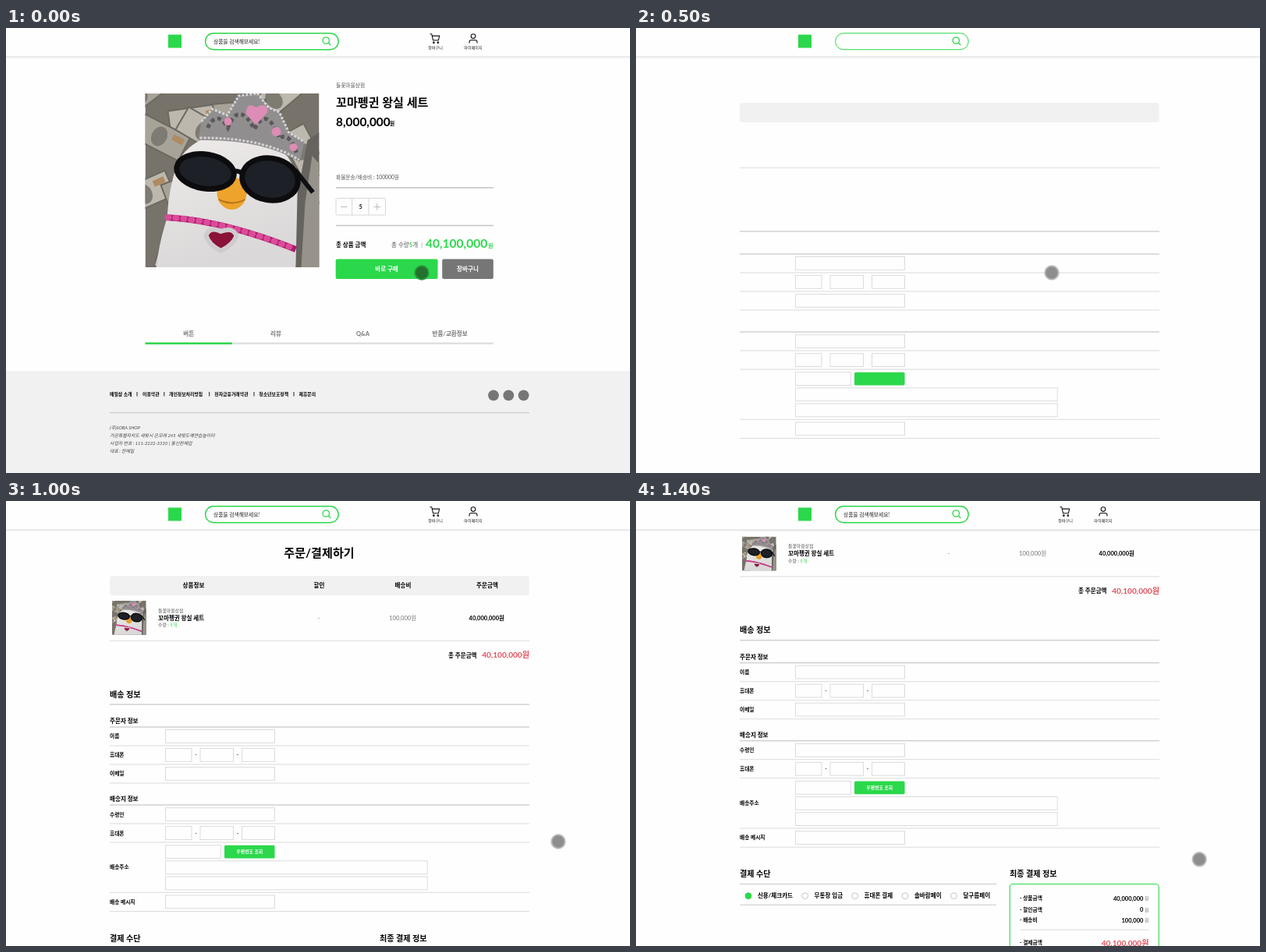
Write an HTML page that moves like this. It is 800 by 571 pixels and loops after 1500 ms.

```html
<!DOCTYPE html>
<html lang="ko">
<head>
<meta charset="utf-8">
<style>
html, body { margin: 0; width: 100%; height: 100%; overflow: hidden; background: #fffefe; }
svg { display: block; }
#stage { width: 100vw; height: 100vh; }
text { font-family: Lato, "Noto Sans CJK KR", "Noto Sans CJK", sans-serif; white-space: pre; }
.bare text, .bare .late { visibility: hidden; }
.bare #search { stroke-width: 1; }
</style>
</head>
<body>
<svg id="stage" viewBox="0 0 800 571">
  <defs>
    <linearGradient id="shade" x2="0" y2="1">
      <stop stop-color="#d8d8da"/><stop offset="1" stop-color="#fffefe" stop-opacity="0"/>
    </linearGradient>
    <linearGradient id="plush" x2=".3" y2="1">
      <stop stop-color="#efecea"/><stop offset="1" stop-color="#dad8d8"/>
    </linearGradient>
    <symbol id="photo" viewBox="0 0 223 223">
      <path fill="#77736b" d="M0 0h223v223H0z"/>
      <g id="notes"></g>
      <path fill="url(#plush)" d="M14 223Q18 190 28 160Q30 120 42 88Q60 54 110 50Q170 54 188 90Q202 130 193 223z"/>
      <path fill="#66635e" d="M193 223L195 130L208 60L223 50V223z"/>
      <path fill="#97938a" d="M200 223L205 140L214 80L223 90V223z"/>
      <path fill="#918e90" d="M68 60L72 36L86 20L105 28L120 3L144 0L158 18L172 24L184 50L204 62L198 88Q150 58 68 60z"/>
      <path fill="none" stroke="#5b5859" stroke-width="5" stroke-dasharray="5 4" d="M80 44Q92 20 106 44Q120 8 140 46Q156 14 172 58Q184 48 194 76"/>
      <path fill="none" stroke="#d5d3d4" stroke-width="3" stroke-dasharray="3 2" d="M70 57Q150 56 197 85M72 36L86 20L105 28L120 3L144 0L158 18L172 24L184 50L204 62"/>
      <g fill="#dd8db6">
        <path d="M142 40L129 26Q130 9 142 18Q156 10 157 24z"/>
        <circle cx="168" cy="49" r="6"/><circle cx="190" cy="69" r="5"/><circle cx="106" cy="36" r="5"/>
      </g>
      <ellipse cx="111" cy="128" rx="19" ry="21" fill="#eea32c"/>
      <path fill="none" stroke="#b87418" stroke-width="2" d="M94 136Q112 145 128 136"/>
      <path fill="none" stroke="#101012" stroke-width="6" d="M106 102Q116 96 128 104M192 98L215 127"/>
      <g fill="#1d2026" stroke="#0c0c0e" stroke-width="7">
        <ellipse cx="77" cy="100" rx="37" ry="22" transform="rotate(9 77 100)"/>
        <ellipse cx="160" cy="110" rx="36" ry="27" transform="rotate(9 160 110)"/>
      </g>
      <path fill="none" stroke="#a91d69" stroke-width="8" d="M27 159Q100 163 193 200"/>
      <path fill="none" stroke="#dc4b9b" stroke-width="8" stroke-linecap="round" stroke-dasharray="1 9" d="M29 159Q100 163 193 200"/>
      <path fill="#8b1238" stroke="#cfccd0" stroke-width="6" stroke-linejoin="round" d="M97 202Q81 194 78 182Q83 170 97 177Q113 171 117 183Q113 194 97 202z"/>
    </symbol>
  </defs>
  <g id="product"></g>
  <g id="order"></g>
  <g id="header"></g>
  <circle id="dot" r="8.7" stroke-width="2"/>
</svg>
<script>
const $ = id => document.getElementById(id);
const GREEN = '#2bd84b', GRAY = '#767676', RED = '#e0505c', BLACK = '#000';

const text = (x, y, s, size = 7.56, weight = 700, fill = BLACK, anchor = 'start', extra = '') =>
  `<text x="${x}" y="${y}" font-size="${size}" font-weight="${weight}" fill="${fill}" text-anchor="${anchor}" ${extra}>${s}</text>`;
const mid = (x, y, s, size, weight, fill) => text(x, y, s, size, weight, fill, 'middle');
const end = (x, y, s, size, weight, fill) => text(x, y, s, size, weight, fill, 'end');
const rect = (x, y, w, h, fill, r = 0, extra = '') =>
  `<rect x="${x}" y="${y}" width="${w}" height="${h}" rx="${r}" fill="${fill}" ${extra}/>`;
const line = (x, y, x2, color = '#dcdade', w = 1) => rect(x, y - w / 2, x2 - x, w, color);
const field = (x, y, w) => rect(x, y, w, 16.8, '#fffefe', 0, 'stroke="#dcdade"');
const photo = (x, y, size) =>
  `<use href="#photo" x="${x}" y="${y}" width="${size}" height="${size}"/>`;

function notes() {
  let s = '';
  for (let i = 0; i < 16; i++) {
    const x = (i * 83) % 230 - 20, y = (i * 47) % 215 - 12, a = (i * 67) % 150 - 75;
    s += `<g transform="translate(${x} ${y}) rotate(${a})">` +
      rect(-32, -17, 68, 34, i % 2 ? '#bcb8ae' : '#a7a399', 0, 'stroke="#6d695f" stroke-width="2"') +
      `<ellipse rx="10" ry="13" fill="#7e7b72"/>` + rect(16, -11, 15, 8, '#b08a62') + '</g>';
  }
  return s;
}

function header() {
  return rect(0, 0, 800, 37, '#fffefe') + rect(0, 36.5, 800, 3.5, 'url(#shade)') +
    rect(208, 8.5, 17, 17, GREEN) +
    rect(255.6, 6.7, 170.6, 21, '#fffefe', 10.5, `id="search" stroke="${GREEN}" stroke-width="1.4"`) +
    text(266, 19.7, '상품을 검색해보세요!', 6.72, 400, '#222') +
    `<g fill="none" stroke="${GREEN}" stroke-width="1.3"><circle cx="410.3" cy="16" r="4.2"/><path d="M413.3 19l3 3"/></g>
     <g class="late" fill="none" stroke="#111" stroke-width="1.1" stroke-linejoin="round">
       <path d="M543.5 7.8h2.3l1.8 8h6.7l1.4-5.7h-9.4"/>
       <circle cx="548.4" cy="18.7" r=".8"/><circle cx="553.8" cy="18.7" r=".8"/>
       <circle cx="599" cy="10.6" r="2.8"/><path d="M594 19.5v-1.4q0-2.6 2.6-2.6h4.8q2.6 0 2.6 2.6v1.4"/>
     </g>` +
    mid(550.5, 26.5, '장바구니', 5.1, 400, '#222') + mid(599, 26.5, '마이페이지', 5.1, 400, '#222');
}

function product() {
  const tabs = ['버튼', '리뷰', 'Q&amp;A', '반품/교환정보'];
  const links = [[133, '메밀샵 소개'], [175, '이용약관'], [209, '개인정보처리방침'],
    [267.3, '전자금융거래약관'], [324.3, '청소년보호정책'], [375.5, '제휴문의']];
  const about = ['(주)SOBA SHOP', '가온특별자치도 새빛시 은모래 245 새빛도예연습놀이터',
    '사업자 번호 : 111-2222-3333 | 통신판매업', '대표 : 한메밀'];
  return photo(178.5, 84, 223) +
    text(423, 76, '들꽃마을상점', 6.72, 400, '#555') +
    text(423, 100.5, '꼬마펭귄 왕실 세트', 15.1) +
    text(423, 126, '8,000,000', 15.4) + text(492, 125, '원', 6.72) +
    text(423, 193.5, '화물운송/배송비 : 100000원', 6.72, 400, '#555') +
    line(423, 205, 625, '#c4c2c4', 1.5) + line(423, 253.5, 625, '#c4c2c4', 1.5) +
    rect(423, 218.5, 63.5, 21.5, '#fffefe', 1.5, 'stroke="#d4d2d4" stroke-width=".9"') +
    '<path fill="none" stroke="#d4d2d4" stroke-width=".9" d="M443.7 218.5v21.5M465 218.5v21.5"/>' +
    '<path fill="none" stroke="#bbb" d="M429 229.5h8.5M471.5 229.5h8.5M475.7 225.2v8.6"/>' +
    mid(454.6, 231.8, '5', 6.72) +
    text(423, 281.3, '총 상품 금액') +
    text(494, 281.3, `총 수량<tspan fill="${GREEN}" font-weight="700">5</tspan>개`, 7.56, 400, '#555') +
    rect(532.7, 275, .8, 7.5, '#bbb') +
    text(538, 282.1, '40,100,000', 15.5, 700, GREEN) + text(618, 281.5, '원', 7, 700, GREEN) +
    rect(422.7, 296.5, 130.8, 25.5, GREEN, 2, 'id="buy"') +
    text(488, 312.2, '바로 구매', 7.56, 700, '#fff', 'middle', 'id="buyText"') +
    rect(559.2, 296.5, 65.6, 25.5, GRAY, 2) + mid(592, 312.2, '장바구니', 7.56, 700, '#fff') +
    tabs.map((s, i) => mid(234.3 + i * 111.6, 395.3, s, 7.56, 700, GRAY)).join('') +
    line(178.5, 404.7, 625, '#e0dfe0', 2.4) + line(178.5, 404.7, 290, GREEN, 2.4) +
    rect(0, 440, 800, 131, '#f2f1f2') +
    links.map(([x, s]) => text(x, 472, s, 5.88)).join('') +
    [168, 202.8, 260.7, 318, 369].map(x => rect(x - .5, 467, 1, 5.5, '#222')).join('') +
    [625, 644.3, 663.6].map(x => `<circle cx="${x}" cy="471.3" r="6.9" fill="${GRAY}"/>`).join('') +
    line(133, 493.7, 671, '#c4c3c4') +
    about.map((s, i) => text(133, 514.6 + i * 10.1, s, 5.88, 400, '#444', 'start', 'font-style="italic"')).join('');
}

function order() {
  const label = (y, s) => text(133, y, s, 6.72);
  const phone = y => label(y + 10.8, '휴대폰') + field(204.5, y, 33.5) + field(249, y, 42.5) +
    field(302.5, y, 42) + mid(243.6, y + 10.8, '-', 7, 400) + mid(297, y + 10.8, '-', 7, 400);
  const row = (y, s) => label(y + 10.8, s) + field(204.5, y, 140);
  const heads = [[240.5, '상품정보'], [401.5, '할인'], [509, '배송비'], [617, '주문금액']];
  const pays = [[144, '신용/체크카드'], [216.7, '무통장 입금'], [280.7, '휴대폰 결제'],
    [345, '솔바람페이'], [407.5, '달구름페이']];
  const sums = [[594.5, '상품금액', '40,000,000'], [609, '할인금액', '0'], [622.8, '배송비', '100,000']];
  const thin = [179.3, 314, 338, 362, 414, 438, 502.3, 526.5];
  return mid(401.5, 72, '주문/결제하기', 15.1) +
    rect(133, 96, 537.7, 25.2, '#f2f1f2', 4) +
    heads.map(([x, s]) => mid(x, 111.4, s)).join('') +
    `<g class="late" style="clip-path:inset(0 round 4px)">${photo(136, 128, 43.7)}</g>` +
    text(195, 142.7, '들꽃마을상점', 5.88, 400, '#555') +
    text(195, 152.6, '꼬마펭귄 왕실 세트') +
    text(195, 161, `수량 : <tspan fill="${GREEN}">5개</tspan>`, 5.88, 400, '#555') +
    mid(401, 152.5, '-', 7.56, 400, GRAY) + mid(508.7, 152.8, '100,000원', 7.56, 400, GRAY) +
    mid(616.3, 152.8, '40,000,000원') +
    thin.map(y => line(133, y, 671)).join('') +
    text(567, 200.7, '총 주문금액') + end(671, 201, '40,100,000원', 10.1, 700, RED) +
    text(133, 251.8, '배송 정보', 10.1) +
    [261, 290, 390].map(y => line(133, y, 671, '#c8c6ca', 1.2)).join('') +
    text(133, 285.2, '주문자 정보') +
    row(293.5, '이름') + phone(317.5) + row(341.5, '이메일') +
    text(133, 385.3, '배송지 정보') +
    row(393.7, '수령인') + phone(417.7) +
    field(204.5, 441.7, 71) + rect(280, 441.7, 64.5, 16.8, GREEN, 1.5) +
    mid(312.3, 452.4, '우편번호 조회', 5.88, 700, '#fff') +
    label(472.4, '배송주소') + field(204.5, 461.8, 335.7) + field(204.5, 482, 335.7) +
    row(505.9, '배송 메시지') +
    text(133, 564.8, '결제 수단', 10.1) + text(479, 564.8, '최종 결제 정보', 10.1) +
    '<g class="late">' + line(133, 573.8, 462, '#c8c6ca') + line(133, 600.5, 462, '#c8c6ca') +
    pays.map(([x, s], i) => `<circle cx="${x}" cy="589" r="3.9" fill="${i ? '#fff' : GREEN}" stroke="${i ? '#c4c4c4' : GREEN}"/>` +
      text(x + 11.9, 591.7, s)).join('') +
    rect(479.3, 573.8, 191, 130, '#fffefe', 4, `stroke="${GREEN}" stroke-width="1.1"`) +
    sums.map(([y, s, n]) => text(492, y, '- ' + s, 6.72) + end(650.5, y + .4, n) +
      text(652, y, '원', 5.88, 400, GRAY)).join('') +
    line(492, 632.5, 657.5) +
    text(492, 651.5, '- 결제금액', 6.72) + end(657.5, 653, '40,100,000원', 10.1, 700, RED) + '</g>';
}

$('notes').innerHTML = notes();
$('product').innerHTML = product();
$('order').innerHTML = order();
$('header').innerHTML = header();

// Pointer positions per 100 ms step, starting at 600 ms
const path = [[533, 314], [562, 331], [626, 371.3], [695, 426], [708, 437],
  [715, 445.3], [718.8, 454.7], [721, 458.5], [722.2, 459.8]];
// Scroll offsets per 100 ms step, starting at 1100 ms
const scrolls = [11, 77.3, 81.5, 82.3];

function draw(now) {
  const step = Math.floor(now % 1500 / 100);
  const shop = step < 5, pressed = step === 4;
  $('product').style.display = shop ? '' : 'none';
  $('order').style.display = shop ? 'none' : '';
  $('stage').classList.toggle('bare', step === 5);
  $('order').setAttribute('transform', `translate(0 ${-(scrolls[step - 11] || 0)})`);
  $('buy').setAttribute('fill', pressed ? '#38cf86' : GREEN);
  $('buyText').setAttribute('fill', pressed ? '#c4f0da' : '#fff');
  const [x, y] = path[Math.max(0, step - 6)];
  const dot = $('dot');
  dot.setAttribute('transform', `translate(${x} ${y})`);
  dot.setAttribute('fill', pressed ? '#4c6c50' : shop ? '#23702f' : '#8f8e8e');
  dot.setAttribute('stroke', pressed ? '#5fa67c' : shop ? '#299a3c' : '#bcbbbb');
  requestAnimationFrame(draw);
}
requestAnimationFrame(draw);
</script>
</body>
</html>
```
